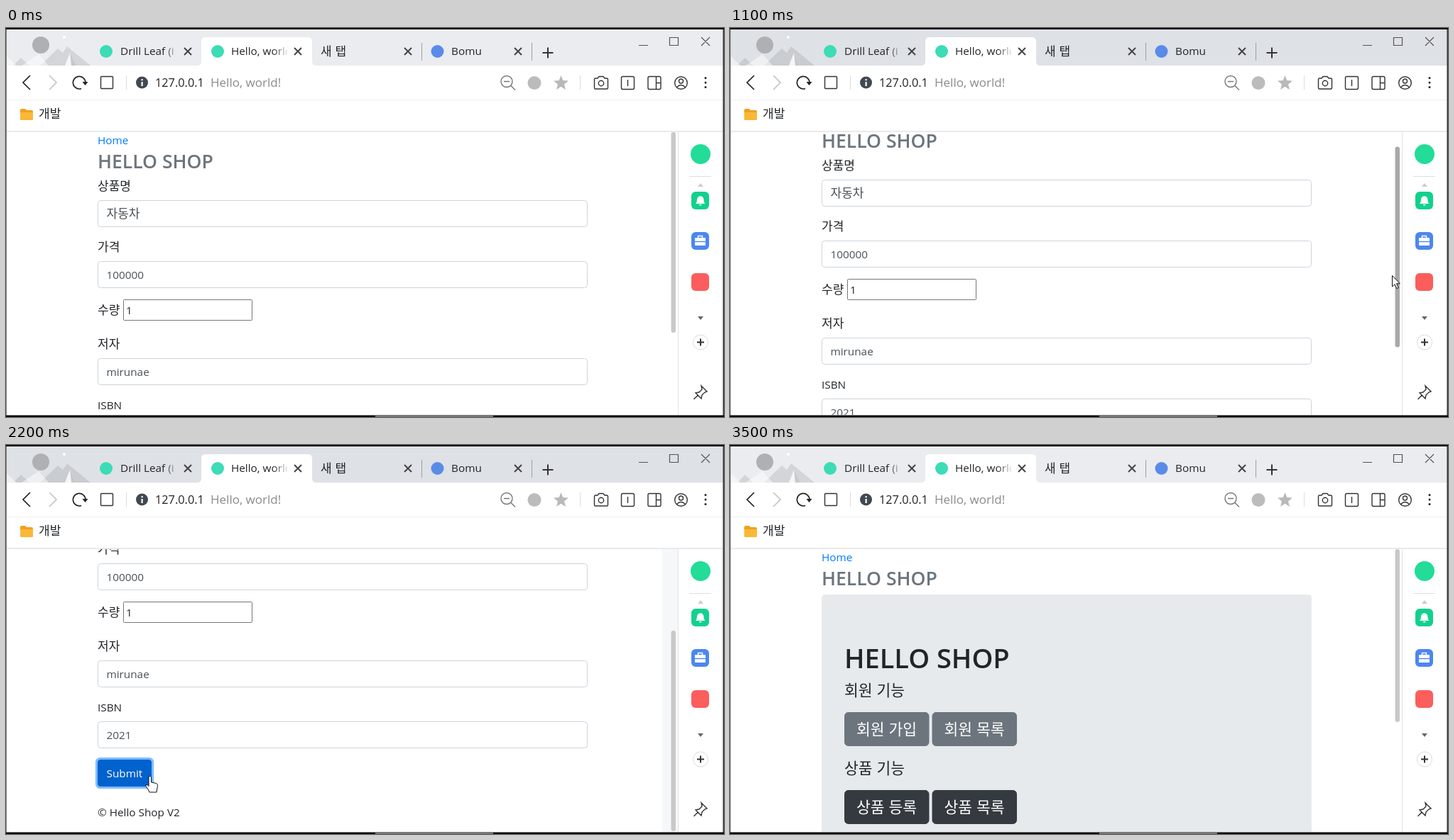
Write an HTML page that moves like this. It is 1011 px wide and 549 px high and loops after 3600 ms.

```html
<!DOCTYPE html>
<html lang="ko">
<head>
<meta charset="utf-8">
<title>Hello, world!</title>
<style>
html, body { margin: 0; width: 100%; height: 100%; overflow: hidden; background: #fff; }
svg { display: block; width: 1011px; height: 549px; }
text { font: 15.3px "Open Sans", "Noto Sans CJK KR", "Noto Sans CJK", sans-serif; fill: #212529; white-space: pre; }
text.ko { font-family: "Noto Sans CJK KR", "Noto Sans CJK", sans-serif; font-size: 17px; font-weight: 350; }
text.big { font-size: 21.5px; font-weight: 300; }
text.h3 { font-size: 26.6px; font-weight: 600; fill: #6c757d; }
text.h1 { font-size: 38px; font-weight: 600; }
.field rect { fill: #fff; stroke: #ced4da; }
.field text { fill: #495057; }
.line { fill: none; stroke: #333; stroke-width: 1.4; }
</style>
</head>
<body>
<script>
const STEP = 100, LOOP = 3600;

const text = (x, y, value, cls = '', extra = '') =>
  `<text x="${x}" y="${y}" class="${cls}" ${extra}>${value}</text>`;
const box = (x, y, w, h, fill, r = 0, extra = '') =>
  `<rect x="${x}" y="${y}" width="${w}" height="${h}" rx="${r}" fill="${fill}" ${extra}/>`;
const disc = (x, y, r, fill, extra = '') =>
  `<circle cx="${x}" cy="${y}" r="${r}" fill="${fill}" ${extra}/>`;
const shape = (d, fill, extra = '') => `<path d="${d}" fill="${fill}" ${extra}/>`;
const line = (d, extra = '') => `<path d="${d}" class="line" ${extra}/>`;
const field = (y, value) =>
  `<g class="field">${box(129.5, y + .5, 689, 37, '#fff', 4)}${text(141.5, y + 25, value)}</g>`;
const cross = x => line(`M${x - 5} 28l10 10m0-10l-10 10`, 'style="stroke:#444;stroke-width:2"');
const button = (x, y, label, color, link) =>
  `<g class="button" data-color="${color}" data-link="${link}">
    ${box(x + .5, y + .5, 118.5, 47, color, 5)}${text(x + 17, y + 31.5, label, 'ko big')}</g>`;
const fade = (id, from, to) =>
  `<linearGradient id="${id}" gradientUnits="userSpaceOnUse" x1="${from}" x2="${to}">
    <stop stop-color="#222"/><stop offset="1" stop-color="#222" stop-opacity="0"/></linearGradient>`;

const titleBar = `
  ${box(0, 2, 1011, 51, '#ebecf0', 0, 'id="bar"')}
  <g id="hills" fill="#d3d5d9">
    <path d="M48 53L73 29l7 6 6-9 33 27z"/><path d="M10 53l11-11 12 11z"/>
  </g>
  ${shape('M1 40l14 13H1zM22 53l24-16 14 16z', '#fff', 'opacity=".5"')}
  ${shape('M83 53l7-18 9 18z', '#f6f6f7')}${shape('M90 35l2 18h7z', '#c6c8cc')}
  ${disc(82, 13, 2, '#fff')}${disc(49, 24, 12, '#aeb0b3')}
  ${shape('M269 53q6 0 6-6V19q0-6 6-6h144q6 0 6 6v28q0 6 6 6z', '#fff')}
  ${disc(141, 33, 9, '#3cdcb6')}${disc(298, 33, 9, '#3cdcb6')}${disc(607.5, 33, 9, '#5b8be8')}
  ${text(161, 38, 'Drill Leaf (i', '', 'style="fill:url(#fadeLeft)"')}
  <g clip-path="url(#tabClip)">${text(317, 38, 'Hello, world!', '', 'style="fill:url(#fadeRight)"')}</g>
  ${text(443, 38.5, '새 탭', 'ko')}${text(627, 38, 'Bomu')}
  ${[256, 411, 566, 721].map(cross).join('')}
  ${line('M585.5 21v25M740.5 21v25', 'style="stroke:#9b9ea3;stroke-width:1"')}
  ${line('M755.5 35h15M763 27.5v15', 'style="stroke-width:2"')}
  ${line('M891 24.5h13M934.5 13.5h12v11h-12zM979 13l12 12m0-12l-12 12', 'style="stroke:#555;stroke-width:1.2"')}`;

const star = Array.from({ length: 10 }, (_, i) => {
  const r = i % 2 ? 4.8 : 11, a = i * Math.PI / 5;
  return `${781.5 + r * Math.sin(a)},${78 - r * Math.cos(a)}`;
}).join(' ');

const toolBar = `
  ${box(1, 53, 1009, 94, '#fff')}${box(1, 101, 1009, 1, '#f0f0f1')}
  ${line('M34 67L24 77l10 10', 'style="stroke:#222;stroke-width:1.7"')}
  ${line('M61 67l10 10-10 10', 'style="stroke:#c4c4c4;stroke-width:1.7"')}
  ${line('M106 85.5A8.8 8.8 0 1 1 112 77', 'style="stroke:#222;stroke-width:1.7"')}
  ${shape('M107.5 76h8l-4 5z', '#222')}
  ${box(133.5, 68.5, 17, 17, 'none', 1, 'class="line"')}
  ${line('M169.5 67v20M808.5 67v20', 'style="stroke:#ddd;stroke-width:1"')}
  ${disc(191.5, 77, 8.5, '#414850')}${box(190.5, 76, 2.2, 6, '#fff')}${box(190.5, 72, 2.2, 2.2, '#fff')}
  ${text(210, 82.5, '127.0.0.1', '', 'style="font-size:16.3px;fill:#222"')}
  ${text(288, 82.5, 'Hello, world!', '', 'style="font-size:17px;fill:#8b8b8b"')}
  <g class="line">${disc(705, 75.5, 8, 'none', 'style="stroke:#777"')}
    <path d="M701 75.5h8M711 81.500l6 6" stroke="#777"/>
    <path d="M828.500 72.500q0-1.500 1.500-1.500h3l2-2.500h6l2 2.500h3q1.500 0 1.500 1.500v12q0 1.500-1.500 1.500h-16q-1.500 0-1.500-1.500z"/>
    ${disc(838, 78, 3.7, 'none')}
    <rect x="866.5" y="68.5" width="18" height="18" rx="2"/><path d="M875.500 73v9"/>
    <rect x="904" y="68.500" width="18" height="18" rx="2"/><path d="M915.500 69v17M915.500 77.500h6"/>
    ${disc(950.5, 77.5, 8.8, 'none')}${disc(950.5, 75, 3, 'none')}<path d="M944.500 83.500q6-6 12 0"/></g>
  ${disc(744, 77.5, 9.5, '#bcbcbc')}<polygon points="${star}" fill="#b9b9b9"/>
  ${[70.5, 77, 83.5].map(y => disc(985, y, 1.5, '#222')).join('')}
  ${shape('M20 116q0-2 2-2h5l2 2h7q2 0 2 2v10q0 2-2 2H22q-2 0-2-2z', '#f0a020')}
  ${shape('M20 119h18v9q0 2-2 2H22q-2 0-2-2z', '#fbb836')}
  ${text(46, 127, '개발', 'ko')}`;

const sideBar = `
  ${box(946, 147, 64, 399, '#fff')}${box(946, 147, 1, 399, '#e2e3e5')}
  ${disc(978, 178, 14, '#22dc98')}${box(962, 209, 31, 1, '#dfdfdf')}
  ${shape('M974 224l4-5 4 5z', '#ccc')}
  ${box(965, 231, 25, 25, '#12d18e', 6)}
  ${shape('M971 248q2-2 2-6a4.700 4.700 0 0 1 9.400 0q0 4 2 6zM975.500 249h4.500q-2.300 3-4.500 0z', '#fff')}
  ${box(965, 288, 25, 25, '#4b87f0', 6)}
  ${box(970, 296, 15, 11, '#fff', 1)}${line('M974.500 296v-2.500h6v2.500', 'style="stroke:#fff"')}
  ${line('M970 301.500h15', 'style="stroke:#4b87f0"')}
  ${box(965, 346, 25, 25, '#fb5e5c', 6)}
  ${shape('M974 407h8l-4 5z', '#666')}
  ${disc(978, 443.5, 10.5, '#fff', 'stroke="#d9dadc"')}
  ${line('M973 443.500h10M978 438.500v10', 'style="stroke-width:2"')}
  ${line('M979 505l8 8-3 1-4 4-1 5-8-8 5-1 4-4zM974.500 518l-6 6')}`;

const form = `
  ${text(129, 164, 'Home', '', 'style="fill:#007bff"')}${text(129, 197.500, 'HELLO SHOP', 'h3')}
  ${text(129, 228.500, '상품명', 'ko')}${field(243, '<tspan font-size="17" font-weight="350">자동차</tspan>')}
  ${text(129, 315, '가격', 'ko')}${field(329, '100000')}
  ${text(129, 404, '수량', 'ko')}
  ${box(165.5, 383.5, 181, 29, '#fff', 1, 'stroke="#767676"')}${text(169, 404, '1')}
  ${text(129, 452, '저자', 'ko')}${field(466, 'mirunae')}
  ${text(129, 538, 'ISBN')}${field(552, '2021')}
  ${box(127.5, 604.5, 79, 41, 'none', 5, 'id="ring" stroke="#007bff" stroke-width="3.200"')}
  ${box(129, 606, 76, 38, '#007bff', 4, 'id="submit"')}
  ${text(141.5, 631, 'Submit', '', 'style="fill:#fff"')}
  ${text(129, 686, '© Hello Shop V2')}`;

const BLUE = '#1a10ea', PURPLE = '#63309a', GRAY = '#6c757d', DARK = '#343a40';
const home = `
  ${text(129, 164, 'Home', '', 'style="fill:#007bff"')}${text(129, 197.500, 'HELLO SHOP', 'h3')}
  ${box(129, 211, 690, 360, '#e7eaed', 5)}
  ${text(161, 315, 'HELLO SHOP', 'h1')}
  ${text(161, 353.500, '회원 기능', 'ko big')}${text(161, 463.500, '상품 기능', 'ko big')}
  ${button(161, 377, '회원 가입', GRAY, BLUE)}${button(284.5, 377, '회원 목록', GRAY, PURPLE)}
  ${button(161, 487, '상품 등록', DARK, PURPLE)}${button(284.5, 487, '상품 목록', DARK, BLUE)}`;

const pointers = `
  <path id="arrow" d="M.5.500V16l3.600-3.300 2.700 6 2.400-1.100-2.600-5.900h4.700z" fill="#fff" stroke="#111"/>
  <path id="hand" d="M-2 1.500q2-2.500 3.500 0V9l7 1.500q2 .5 2 3l-1.500 9.500H-1l-2-4-3-4.500q-.5-3 2-2l2 2z" fill="#fff" stroke="#111"/>`;

document.body.innerHTML = `<svg viewBox="0 0 1011 549">
  <defs>${fade('fadeLeft', 222, 244)}${fade('fadeRight', 376, 399)}
    <clipPath id="tabClip">${box(317, 15, 79, 36, '#000')}</clipPath>
    <clipPath id="pageClip">${box(1, 147, 945, 399, '#000')}</clipPath>
    <clipPath id="statusClip">${box(0, 517, 183, 29, '#000')}</clipPath></defs>
  ${box(0, 0, 1011, 549, '#fff')}${titleBar}${toolBar}
  <g clip-path="url(#pageClip)">
    <g id="form">${form}</g><g id="home">${home}</g>
    ${box(924, 147, 22, 399, '#f6f7f8', 0, 'id="track"')}
    ${box(936.5, 147, 6.5, 283, '#c9c9c9', 3.2, 'id="thumb"')}
    <g id="status" clip-path="url(#statusClip)">${box(-4, 517, 187, 34, '#dee1e6', 4)}
      ${text(9, 537, '127.0.0.1:8080/members/new', '', 'style="fill:#6b6f74"')}</g>
  </g>
  ${sideBar}${box(0, 145.5, 1011, 1, '#d4d5d7')}
  ${box(0, 2, 1, 545, '#777')}${box(1009.5, 2, 1.5, 545, '#333')}
  ${box(0, 0, 1011, 2, '#0a0a0a')}${box(0, 546.5, 1011, 2.5, '#0a0a0a')}${box(520, 546.5, 166, 2.5, '#777')}
  ${pointers}
</svg>`;

const $ = id => document.getElementById(id);
const set = (id, attrs) => {
  for (const name in attrs) $(id).setAttribute(name, attrs[name]);
};
const show = (id, visible) => set(id, { visibility: visible ? 'visible' : 'hidden' });
const buttons = [...document.querySelectorAll('.button')];

// Pointer positions by step; each holds until the next one.
const path = {
  0: null, 1: [713, 465], 2: [754, 412], 3: [806, 430], 4: [882, 404], 5: [882, 395],
  8: [932, 329], 9: [932, 332], 10: [932, 338], 11: [932, 349], 12: [932, 430], 13: [932, 444],
  14: [547, 498], 15: [326, 509], 16: [179, 491], 17: [89, 452], 18: [150, 460], 19: [203, 467],
  26: [229, 404], 27: [258, 388], 28: [435, 321], 29: [720, 190], 30: [1000, 68], 31: null
};
const scrolls = { 0: 0, 9: 4, 10: 13, 11: 29, 12: 143, 13: 162 };
const statusOpacity = { 0: 0, 27: 1, 28: .7, 29: .3, 30: 0 };
const held = (keys, step) => {
  while (!(step in keys)) step--;
  return keys[step];
};

function render(step) {
  const focused = step >= 8 && step < 35;
  set('bar', { fill: focused ? '#dee1e6' : '#ebecf0' });
  set('hills', { fill: focused ? '#c9ccd1' : '#d3d5d9' });

  const atHome = step >= 23, scroll = held(scrolls, step);
  show('form', !atHome);
  show('home', atHome);
  set('form', { transform: `translate(0 ${-scroll})` });
  show('track', step >= 12 && step < 23);
  set('thumb', {
    y: 147 + (atHome ? 0 : scroll / 1.41),
    height: atHome ? 244 : 283,
    fill: step >= 8 && step < 14 ? '#a9a9a9' : '#c9c9c9'
  });

  set('submit', { fill: step < 19 ? '#007bff' : step < 22 ? '#0069d9' : '#0062cc' });
  set('ring', { opacity: step < 20 ? 0 : step < 21 ? .25 : .5 });

  buttons.forEach((node, i) => {
    const [face, label] = node.children, { color, link } = node.dataset;
    const loading = step === 23, hovered = i === 0 && step >= 26 && step < 29;
    face.setAttribute('fill', hovered ? '#5a6268' : color);
    face.setAttribute('fill-opacity', loading ? .12 : 1);
    face.setAttribute('stroke', loading ? link : hovered ? '#5a6268' : color);
    label.style.fill = loading ? link : '#fff';
    label.style.fontWeight = 350;
  });
  set('status', { opacity: held(statusOpacity, step) });

  const point = held(path, step);
  const onLink = step >= 19 && step < 24 || step === 26 || step === 27;
  show('arrow', point && !onLink);
  show('hand', point && onLink);
  if (point) set(onLink ? 'hand' : 'arrow', { transform: `translate(${point})` });
}

function tick() {
  render(Math.floor(performance.now() % LOOP / STEP));
  requestAnimationFrame(tick);
}
tick();
</script>
</body>
</html>
```
